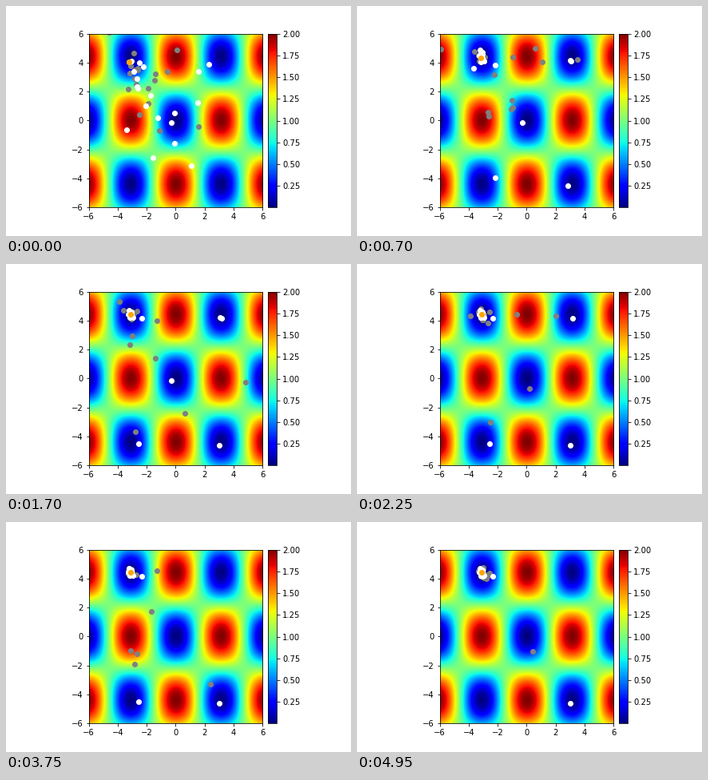
A matplotlib script for the animation above (5 s loop, 432 by 288 pixels).

```python
import numpy as np
import matplotlib.pyplot as plt
from matplotlib.animation import FuncAnimation

W, H, DPI = 432, 288, 72
FRAMES, INTERVAL = 100, 50
SEED = 11
NEST = np.array([-3.13, 4.43])  # minimum where the swarm gathers
FIRST = np.array([-3.24, 4.04])  # best solution at the start
SWARM = 12
NEVER = FRAMES

# Stragglers: start, local minimum they settle in, step at which they leave it
STRAGGLERS = [
    ((1.56, 3.38), (3.2, 4.15), 67),
    ((2.28, 3.88), (3.1, 4.2), 40),
    ((1.51, 1.23), (-2.56, -4.5), 88),
    ((-0.09, 0.51), (-2.36, 4.15), NEVER),
    ((-0.3, -0.15), (-0.3, -0.15), 41),
    ((1.07, -3.13), (3.02, -4.62), NEVER),
    ((-2.63, 2.22), (-3.74, 3.71), 34),
]

plt.rcParams.update({"font.family": "DejaVu Sans", "font.size": 10})


def griewank(x, y):
    return 1 + (x**2 + y**2) / 4000 - np.cos(x) * np.cos(y / np.sqrt(2))


def swarm_starts():
    """A trail from the nest down to the lower left, wider along the way."""
    rng = np.random.default_rng(SEED)
    t = np.linspace(0, 1, SWARM)
    x = -3.05 + 1.6 * t + rng.normal(0, 1, SWARM) * np.sqrt(t)
    return np.column_stack([x, 4.1 - 6.7 * t**1.7])


STARTS = swarm_starts()
DRIFT = np.clip(np.random.default_rng(SEED + 1).normal(size=(20, 2)), -1.6, 1.6)


def in_nest(i, step):
    """Place in the nest, drawn closer at each of the member's own updates."""
    last = max(0, step - (step + 3 * i) % 8)
    spread = np.array([0.1, 0.16 + 0.25 * np.exp(-last / 12)])
    return NEST + spread * DRIFT[i]


def best(step):
    hops = min(step // 5, 3)
    return NEST + (FIRST - NEST) * 0.5**hops if hops < 3 else NEST


def swarm_member(i, step):
    return in_nest(i, step) if step > i * 3 % 5 else STARTS[i]


def straggler(k, step):
    start, rest, leave = STRAGGLERS[k]
    if step >= leave:
        return in_nest(SWARM + k, step)
    hops = (step + k % 3) // 6
    return np.array(rest) + np.subtract(start, rest) * 0.3**hops


def population(step):
    return np.array([best(step)]
                    + [swarm_member(i, step) for i in range(SWARM)]
                    + [straggler(k, step) for k in range(len(STRAGGLERS))])


def candidates(step, pop):
    """Differential evolution: pull to the best plus a random difference."""
    rng = np.random.default_rng(500 + step)
    n = len(pop)
    a, b = pop[rng.integers(n, size=n)], pop[rng.integers(n, size=n)]
    pull, mix = rng.uniform(0, 0.7, (2, n, 1))
    noise = rng.normal(0, 0.12, (n, 2))
    return pop + pull * (pop[0] - pop) + mix * (a - b) + noise


# Square plot with a colour bar beside it, centred in the default margins
SIDE = 0.755 * H
PAD, BAR = 0.1 * DPI, 0.05 * SIDE
LEFT = 0.5125 * W - (SIDE + PAD + BAR) / 2


def add_box(left, width):
    return fig.add_axes([left / W, 0.125, width / W, SIDE / H])


fig = plt.figure(figsize=(W / DPI, H / DPI), dpi=DPI, facecolor="white")
ax = add_box(LEFT, SIDE)
cax = add_box(LEFT + SIDE + PAD, BAR)

grid = np.linspace(-6, 6, 100)
field = ax.imshow(griewank(*np.meshgrid(grid, grid)), cmap="jet", origin="lower",
                  extent=(-6, 6, -6, 6), interpolation="bilinear", aspect="auto")
ax.set(xlim=(-6, 6), ylim=(-6, 6), xticks=range(-6, 7, 2), yticks=range(-6, 7, 2))
fig.colorbar(field, cax=cax, ticks=np.arange(0.25, 2.01, 0.25), format="%.2f")


def dots(color):
    return ax.plot([], [], "o", color=color, markersize=6)[0]


trial_dots, swarm_dots, best_dot = dots("gray"), dots("white"), dots("orange")


def update(step):
    pop = population(step)
    trial_dots.set_data(*candidates(step, pop).T)
    swarm_dots.set_data(*pop.T)
    best_dot.set_data(*pop[:1].T)
    return trial_dots, swarm_dots, best_dot


anim = FuncAnimation(fig, update, frames=FRAMES, interval=INTERVAL, repeat=True)
plt.show()
```
